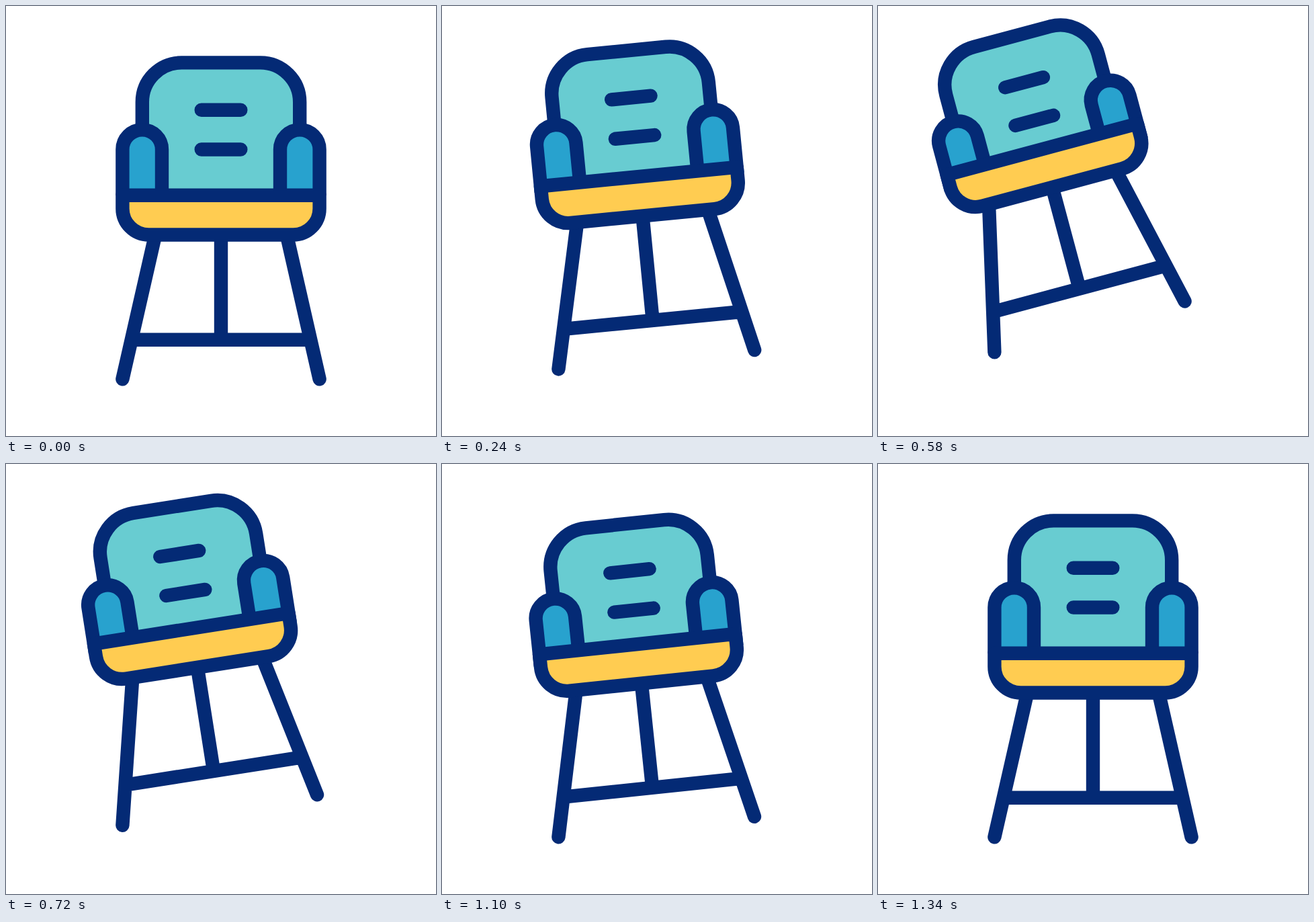
Recreate the animation shown at these times as an HTML page. Size 640 by 640 pixels, loop 1800 ms.

```html
<!DOCTYPE html>
<html lang="en">
<head>
<meta charset="utf-8">
<title>High chair</title>
<style>
  html, body { margin: 0; width: 100%; height: 100%; overflow: hidden; background: #fff; }
  svg { display: block; width: 100vw; height: 100vh; }
</style>
</head>
<body>
<svg viewBox="0 0 640 640">
  <g id="chair" fill="none" stroke="#042a75" stroke-width="20.4" stroke-linecap="round" stroke-linejoin="round">
    <g id="top">
      <path fill="#68ccd1" stroke-linecap="butt" d="M202.8 281.8V143A58.6 58.6 0 0 1 261.4 84.4H378.6A58.6 58.6 0 0 1 437.2 143V281.8"/>
      <path d="M290.7 154.8H349.3M290.7 213.5H349.3"/>
      <g fill="#28a2ce" stroke-linecap="butt">
        <path d="M173.4 281.8V213.5A29.3 29.3 0 0 1 232 213.5V281.8"/>
        <path d="M408 281.8V213.5A29.3 29.3 0 0 1 466.6 213.5V281.8"/>
      </g>
    </g>
    <path d="M222.3 340.5L173.4 555.3M417.7 340.5L466.6 555.3M320 340.5V496.7M186.8 496.7H453.2"/>
    <path fill="#ffcc51" d="M173.4 281.8H466.6V301.4A39.1 39.1 0 0 1 427.5 340.5H212.5A39.1 39.1 0 0 1 173.4 301.4Z"/>
  </g>
</svg>
<script>
  const LOOP = 1800;
  const chair = document.getElementById('chair');
  const top_ = document.getElementById('top');

  // Each track is a list of [time in ms, value].
  const tilt = [[0, 0], [581, -15], [900, 0], [1110, -6], [1335, 0]];
  const lift = [[0, 0], [581, -40], [838, 0]];
  const sink = [[0, 0], [581, 24], [900, 0], [1110, 17.7], [1335, 0]];

  const ease = u => u * u * (3 - 2 * u);

  function valueAt(track, t) {
    for (let i = 1; i < track.length; i++) {
      const [t0, a] = track[i - 1];
      const [t1, b] = track[i];
      if (t < t1) return a + (b - a) * ease((t - t0) / (t1 - t0));
    }
    return track[track.length - 1][1];
  }

  function draw(t) {
    chair.setAttribute('transform',
      `translate(0 ${valueAt(lift, t)}) rotate(${valueAt(tilt, t)} 173.4 555.3)`);
    top_.setAttribute('transform', `translate(0 ${valueAt(sink, t)})`);
  }

  let start;
  function tick(now) {
    if (start === undefined) start = now;
    draw(Math.max(0, now - start) % LOOP);
    requestAnimationFrame(tick);
  }

  draw(0);
  requestAnimationFrame(tick);
</script>
</body>
</html>
```
